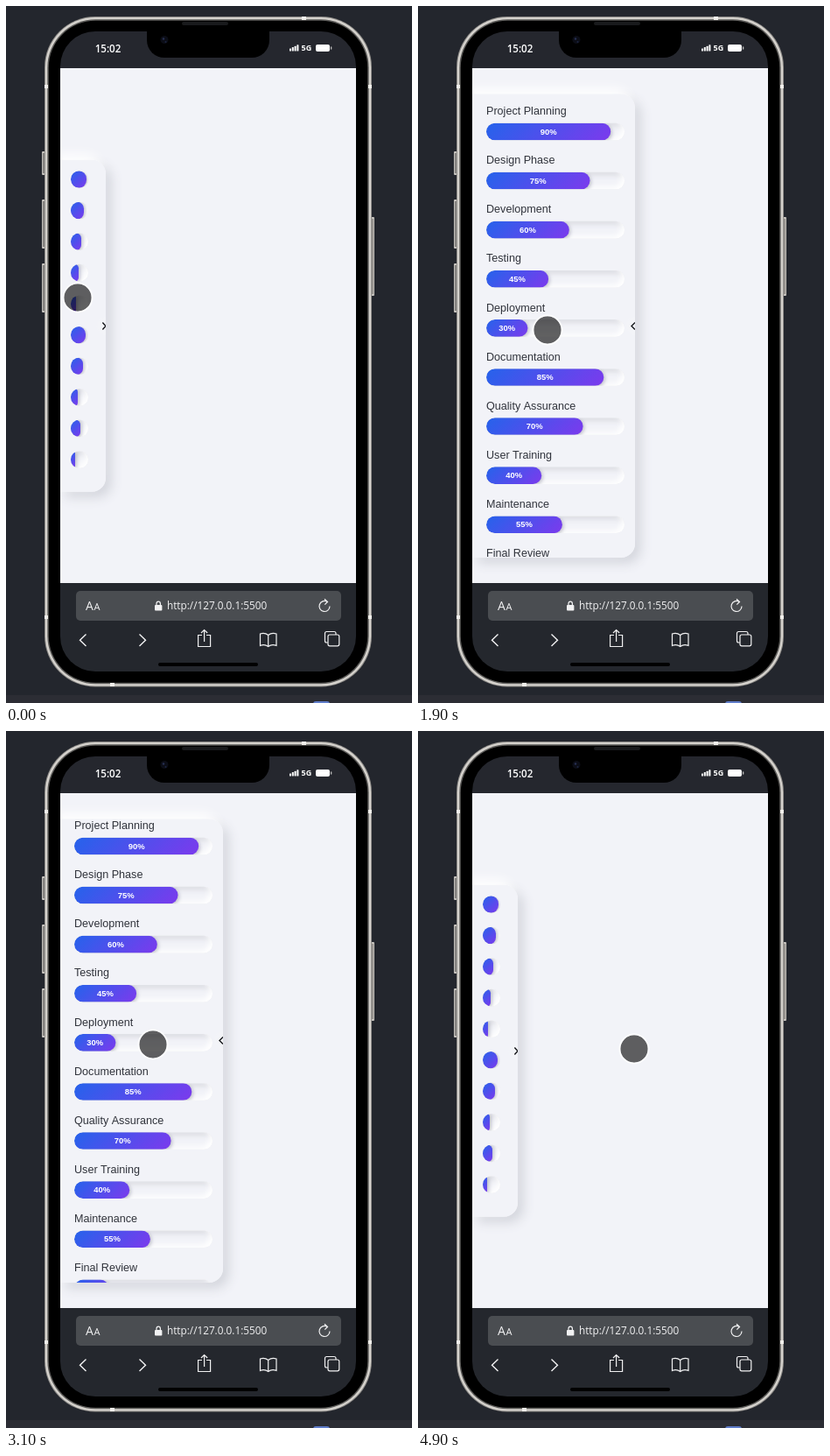
These frames come from a looping animation (464x796 px, 5 s). An HTML page with a canvas:

```html
<!DOCTYPE html>
<html lang="en">
<head>
<meta charset="utf-8">
<title>Progress sidebar</title>
<style>
html, body { margin: 0; width: 100%; height: 100%; overflow: hidden; background: #23262d; }
canvas { display: block; width: 464px; height: 796px; }
</style>
</head>
<body>
<canvas id="stage" width="464" height="796"></canvas>
<script>
const ctx = document.getElementById('stage').getContext('2d');
const LOOP = 5000, STEP = 100;
const OPEN_AT = 850, CLOSE_AT = 4350, SLIDE = 300;
const PAGE = '#f2f3f8', MID_Y = 365;
const SANS = '"Liberation Sans", Arial, sans-serif';
const UI = '"Open Sans", "Noto Sans", sans-serif';

const tasks = [
  ['Project Planning', 90], ['Design Phase', 75], ['Development', 60],
  ['Testing', 45], ['Deployment', 30], ['Documentation', 85],
  ['Quality Assurance', 70], ['User Training', 40], ['Maintenance', 55],
  ['Final Review', 25]
];

// Keys are [time, value...]
const pointerKeys = [
  [0, 82, 333], [100, 83, 334], [600, 108, 362], [1200, 108, 362], [1400, 121, 376],
  [1900, 148, 370], [2500, 165, 359], [2800, 167, 326], [3100, 168, 358],
  [3300, 169, 371], [3600, 172, 371], [4100, 247, 363], [LOOP, 247, 363]
];
const scrollKeys = [[0, 0], [2500, 0], [2800, 44], [3100, 12], [3300, 0], [LOOP, 0]];

const clamp = v => Math.max(0, Math.min(1, v));
const lerp = (a, b, p) => a + (b - a) * p;
const easeOut = p => 1 - (1 - p) ** 2;

function sample(keys, t) {
  const n = keys.findIndex(k => k[0] > t);
  const a = keys[n - 1], b = keys[n];
  let p = (t - a[0]) / (b[0] - a[0]);
  p = p * p * (3 - 2 * p);
  return a.slice(1).map((v, i) => lerp(v, b[i + 1], p));
}

function rounded(x, y, w, h, r) {
  ctx.beginPath();
  ctx.roundRect(x, y, w, h, r);
}

function box(x, y, w, h, r, color) {
  rounded(x, y, w, h, r);
  ctx.fillStyle = color;
  ctx.fill();
}

function disc(x, y, r, color) {
  ctx.beginPath();
  ctx.arc(x, y, r, 0, 7);
  ctx.fillStyle = color;
  ctx.fill();
}

function line(d, color, width) {
  ctx.strokeStyle = color;
  ctx.lineWidth = width;
  ctx.stroke(new Path2D(d));
}

function text(s, x, y, font, color, align = 'left') {
  ctx.font = font;
  ctx.fillStyle = color;
  ctx.textAlign = align;
  ctx.fillText(s, x, y);
}

function shadow(dx, dy, blur, color) {
  ctx.shadowOffsetX = dx;
  ctx.shadowOffsetY = dy;
  ctx.shadowBlur = blur;
  ctx.shadowColor = color;
}

function clipped(x, y, w, h, r, draw) {
  ctx.save();
  rounded(x, y, w, h, r);
  ctx.clip();
  draw();
  ctx.restore();
}

function phone() {
  ctx.fillStyle = '#23262d';
  ctx.fillRect(0, 0, 464, 796);
  ctx.fillStyle = '#2c2d34';
  ctx.fillRect(0, 787, 464, 9);
  box(351, 794, 19, 6, 3, '#5f7cc9');

  for (const [y, h] of [[166, 27], [221, 56], [294, 56]]) {
    box(41, y, 4, h, 1, '#c4c1bc');
    box(42.3, y + 2, 1.2, h - 4, 0, '#5d5c5b');
  }
  box(417, 241, 4, 90, 1, '#c4c1bc');
  box(418.5, 243, 1.2, 86, 0, '#77736f');

  box(44, 12, 374, 765.5, 58, '#8d8b88');
  box(45, 13, 372, 763.5, 57, '#d5d2cd');
  box(47.3, 15.3, 367.4, 759, 55, '#5e5d5b');
  box(48.8, 16.8, 364.4, 756, 53.5, '#000');

  ctx.fillStyle = '#f0eeea';
  for (const y of [90, 696]) {
    ctx.fillRect(44, y, 4, 4);
    ctx.fillRect(414, y, 4, 4);
  }
  ctx.fillRect(338, 12, 5, 4);
  ctx.fillRect(119, 773, 5, 4);
  box(201, 18, 53, 4, 2, '#191a1c');
}

function statusBar() {
  ctx.fillStyle = '#25272e';
  ctx.fillRect(62, 29, 338, 42);
  box(161, 15, 140, 44, [0, 0, 20, 20], '#000');
  disc(181, 38.5, 4.5, '#0b0d16');
  disc(180, 37.5, 1.2, '#273052');
  disc(182.5, 41, 1, '#1b2440');
  text('15:02', 116.5, 53, '600 11.6px ' + UI, '#fff', 'center');
  for (let i = 0; i < 4; i++) {
    const h = 3 + i * 1.4;
    box(324 + i * 2.8, 51.5 - h, 2, h, 0.5, '#fff');
  }
  text('5G', 337.5, 51.3, 'bold 9px ' + UI, '#fff');
  box(354, 44, 16, 8, 2, '#fff');
  box(371, 46.3, 1.3, 3.4, 0.6, '#bbb');
}

function browserBar() {
  const ink = '#f1f1f2';
  ctx.fillStyle = '#24272d';
  ctx.fillRect(62, 659, 338, 102);
  box(80, 668, 303, 34, 5, '#4a4d51');
  text('A', 91, 690, '14px ' + UI, ink);
  text('A', 100.5, 690, '11px ' + UI, ink);

  box(170, 684, 8.4, 6.5, 1, ink);
  line('M172 685 V682.5 A2.2 2.3 0 0 1 176.4 682.5 V685', ink, 1.2);
  text('http://127.0.0.1:5500', 184, 689, '11.75px ' + UI, ink);

  line('M367 680.3 A6 6 0 1 0 370 685.5 M364 677.3 L367.5 680.5 L364.3 683.6', ink, 1.2);
  line('M91.5 717.5 L84.5 724.2 L91.5 731', ink, 1.4);
  line('M152.5 717.5 L159.5 724.2 L152.5 731', ink, 1.4);
  line('M224 718.5 H219.6 V731.5 H233.6 V718.5 H229 M226.6 726 V712.7 M223 716 L226.6 712.5 L230.2 716', ink, 1.2);
  line('M299.7 718.5 C297 716.3 293 716.2 290.5 717 V730.5 C293 729.5 297 729.5 299.7 731.5 ' +
       'C302.4 729.5 306.4 729.5 309 730.5 V717 C306.4 716.2 302.4 716.3 299.7 718.5 V731.5', ink, 1.2);
  line('M368 727 H366.5 Q364.5 727 364.5 725 V716.5 Q364.5 714.5 366.5 714.5 H375 Q377 714.5 377 716.5 V718', ink, 1.2);
  rounded(368, 718, 12.8, 12.8, 2);
  ctx.stroke();
  box(174, 750, 114, 4, 2, '#000');
}

function insetShadow(x, y, w, h, r, d, color) {
  ctx.save();
  shadow(d, d, 6.3, color);
  ctx.beginPath();
  ctx.rect(x - 40, y - 40, w + 80, h + 80);
  ctx.roundRect(x, y, w, h, r);
  ctx.fillStyle = color;
  ctx.fill('evenodd');
  ctx.restore();
}

function bar(x, cy, track, percent, showLabel) {
  const h = 19.6, y = cy - h / 2, r = h / 2;
  const w = track * percent / 100, k = (w + h) / 4;
  clipped(x, y, track, h, r, () => {
    insetShadow(x, y, track, h, r, 3, '#d6d7de');
    insetShadow(x, y, track, h, r, -3, '#ffffff');
    const g = ctx.createLinearGradient(x + w / 2 - k, cy - k, x + w / 2 + k, cy + k);
    g.addColorStop(0, '#2563eb');
    g.addColorStop(1, '#7c3aed');
    shadow(1.5, 1.5, 4, 'rgba(120,122,140,.45)');
    box(x, y, w, h, Math.min(r, w / 2), g);
    shadow(0, 0, 0, 'transparent');
    if (showLabel) {
      text(percent + '%', x + w / 2, cy + 3.1, 'bold 9.45px ' + SANS, '#fff', 'center');
    }
  });
}

function panel(t) {
  const open = t >= OPEN_AT && t < CLOSE_AT;
  const p = easeOut(clamp((t - (t < CLOSE_AT ? OPEN_AT : CLOSE_AT)) / SLIDE));
  const slide = t < CLOSE_AT ? p : 1 - p;
  const w = lerp(52, 186, slide), h = open ? 529.5 : 379;
  const x = 62, y = MID_Y - h / 2 + 0.2;
  const pad = lerp(12, 16, slide), track = lerp(20, 158, slide);
  const pitch = open ? 56.1 : 35.55;
  const scroll = sample(scrollKeys, t)[0];
  const radius = [0, 16, 16, 0];

  ctx.save();
  shadow(6.3, 6.3, 12.6, '#d3d5dc');
  box(x, y, w, h, radius, PAGE);
  shadow(-6.3, -6.3, 12.6, '#ffffff');
  box(x, y, w, h, radius, PAGE);
  ctx.restore();

  clipped(x, y, w, h, radius, () => {
    const top = y - scroll;
    tasks.forEach(([name, percent], i) => {
      const cy = top + (open ? 43 : 22.3) + i * pitch;
      if (open) text(name, x + pad, cy - 19.3, '12.6px ' + SANS, '#30333b');
      bar(x + pad, cy, track, percent, open);
    });
    const edge = x + w, hy = MID_Y + 0.5 - scroll;
    const pressed = (t >= 700 && t < 900) || (t >= 4100 && t < 4300);
    disc(edge, hy, 10, pressed ? '#8f9fd8' : '#f3f4f8');
    const tip = open ? edge - 4 : edge;
    const tail = open ? edge : edge - 3.6;
    line(`M${tail} ${hy - 4} L${tip} ${hy} L${tail} ${hy + 4}`, '#17181c', 1.4);
  });
}

function pointer(t) {
  const [x, y] = sample(pointerKeys, t);
  disc(x, y, 15.7, 'rgba(0,0,0,.61)');
  ctx.beginPath();
  ctx.arc(x, y, 16.6, 0, 7);
  ctx.strokeStyle = 'rgba(255,255,255,.75)';
  ctx.lineWidth = 1.8;
  ctx.stroke();
}

function draw(t) {
  phone();
  clipped(62, 29, 338, 731, 40, () => {
    statusBar();
    ctx.fillStyle = PAGE;
    ctx.fillRect(62, 71, 338, 588);
    clipped(62, 71, 338, 588, 0, () => {
      panel(t);
      pointer(t);
    });
    browserBar();
  });
}

const start = performance.now();
function tick() {
  const t = (performance.now() - start) % LOOP;
  draw(Math.floor(t / STEP) * STEP);
  requestAnimationFrame(tick);
}
tick();
</script>
</body>
</html>
```
